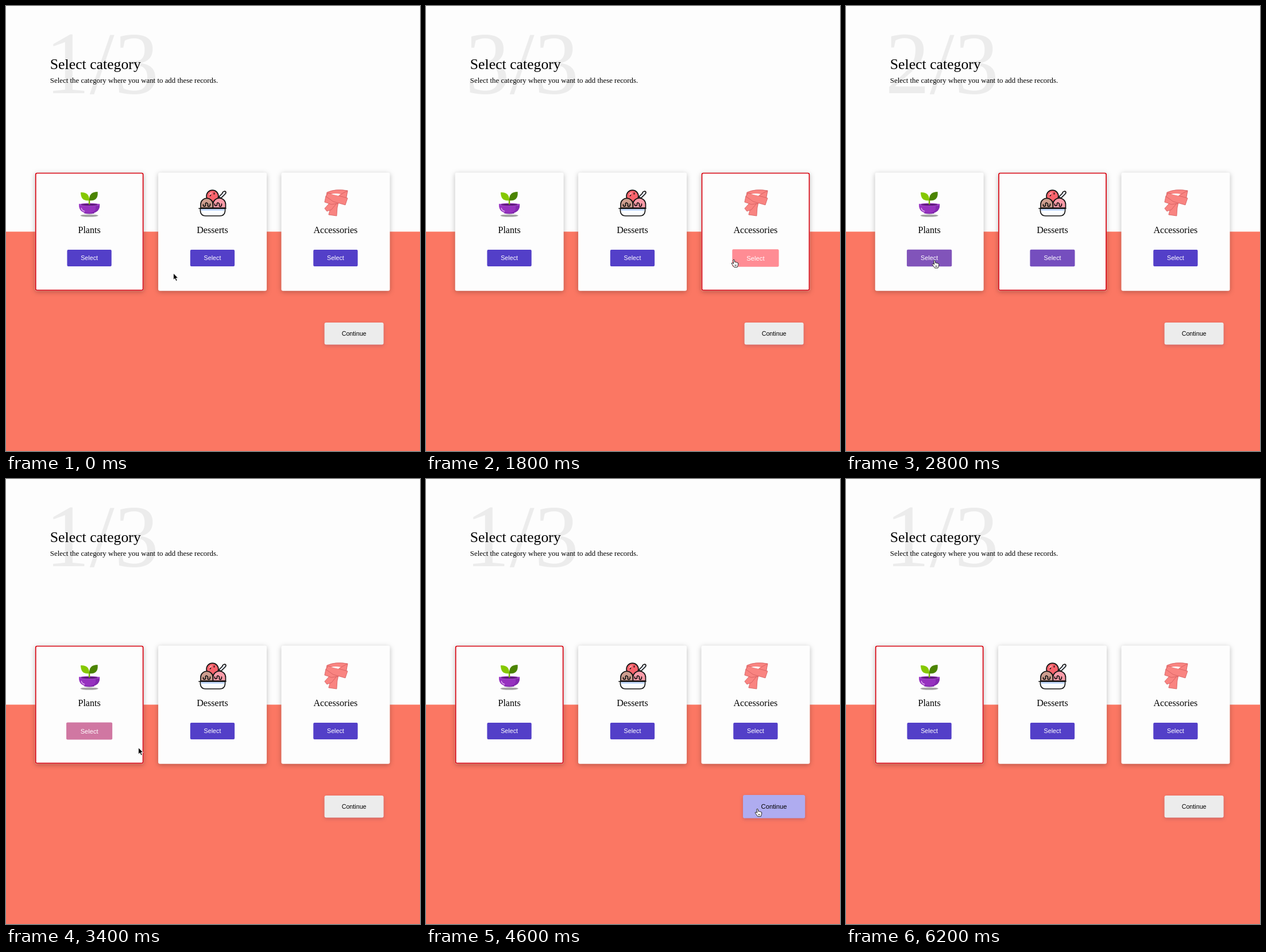
Write an HTML page that moves like this. It is 721 by 776 pixels and loops after 6.4 s.

```html
<!DOCTYPE html>
<html lang="en">
<meta charset="utf-8">
<title>Select category</title>
<style>
  html, body { margin: 0; width: 100%; height: 100%; overflow: hidden; background: #fdfdfd; }
  svg { display: block; font-family: "Liberation Serif", Times, serif; }
  .mid { text-anchor: middle; }
  .label { font: 10.73px "Liberation Sans", Arial, sans-serif; text-anchor: middle; }
  .card { filter: drop-shadow(0 2px 4px rgba(0, 0, 0, .26)); }
  .lift { filter: drop-shadow(0 2px 3px rgba(70, 40, 90, .26)); }
  .line { stroke: #111; stroke-width: 1.7; stroke-linecap: round; stroke-linejoin: round; }
  .scarf { fill: #f98481; stroke: #d25a5c; stroke-width: .8; stroke-linejoin: round; }
</style>
<svg id="stage" width="721" height="776" viewBox="0 0 721 776">
  <rect width="721" height="776" fill="#fdfdfd"/>
  <rect y="393.5" width="721" height="383" fill="#fb7763"/>
  <text id="step" x="68.5" y="152" font-size="154.5" fill="#ececec">1/3</text>
  <text x="76.8" y="109.5" font-size="25.76">Select category</text>
  <text x="76.8" y="133.7" font-size="12.88">Select the category where you want to add these records.</text>
  <g id="cards"></g>
  <g id="cursor">
    <path id="arrow" d="M0 0V11.6L2.7 9.2 4.6 13.6 6.7 12.7 4.8 8.4H8.3Z" stroke="#fff" stroke-width=".9"/>
    <path id="hand" d="M-1.2 1Q0-.8 1.2 1L1.7 4.6Q3 3.8 3.9 5 5.3 4.4 6 5.7 7.6 5.4 7.8 7L7.2 10.6 6.2 13.4H.6L-1.6 10.2-3.8 7.1Q-3.6 5.2-1.6 6.3L-.3 7.4ZM2.2 9.2V11.4M4 9.2V11.4" fill="#fff" stroke="#222" stroke-width="1" stroke-linejoin="round"/>
  </g>
</svg>
<script>
const $ = id => document.getElementById(id);
const LOOP = 6400, TICK = 200, FADE = 200;
const VIOLET = [83, 63, 200], PINK = [255, 140, 148];
const GREY = [236, 236, 236], LILAC = [175, 172, 240];

const plant = `
  <ellipse cx="0" cy="365.6" rx="15.5" ry="2.2" fill="#a3a3a3"/>
  <path d="M-8 357H8L9 361.5Q0 363.5-9 361.5Z" fill="#7620a5"/>
  <path d="M-18 345Q-19 360-4 361H4Q19 360 18 345Z" fill="#9632bf"/>
  <path d="M3 361H4Q19 360 18 345L11 349Q13 358 3 361Z" fill="#8229ad"/>
  <ellipse cx="0" cy="346.5" rx="18" ry="2.7" fill="#a94bd0"/>
  <ellipse cx="0" cy="346.5" rx="14.5" ry="1.7" fill="#5b1a78"/>
  <path d="M-14 352Q-13 357-8 358" fill="none" stroke="#d9a5ec" stroke-width="1.4"/>
  <path d="M0 346V336" stroke="#73b500" stroke-width="2.4"/>
  <path d="M-15 325Q0 324 0 339Q-15 341-15 325Z" fill="#85c800"/>
  <path d="M14.5 324Q-1 324 0 339Q16 341 14.5 324Z" fill="#4b8400"/>`;

const dessert = `
  <g class="line">
    <path d="M11 333 17 327Q18 323 22 323Q25 325 22 328L15 335Z" fill="#eaf1ff"/>
    <circle cx="0" cy="331.5" r="10.4" fill="#f9636c"/>
    <path d="M-20.5 352V346A10.7 10.7 0 0 1 1 346V352Z" fill="#cd9e8f"/>
    <path d="M1 352V346A11 11 0 0 1 23 346V352Z" fill="#fd9ca9"/>
    <path d="M-16 346V348Q-14 351-12 348V344Q-10 342-8 345V349Q-5 351-4 347V345M4 345V347Q6 350 8 347V344Q10 342 12 345V349Q15 351 16 347V345" fill="none"/>
    <path d="M-21 353H22V358Q21 366 13 366H-12Q-20 366-21 358Z" fill="#fbfdff"/>
    <path d="M-20 354H21V357H-20Z" fill="#c4dafd" stroke="none"/>
    <path d="M-23.5 353H23.5" fill="none"/>
  </g>
  <path d="M-5 330Q-4 326-1 326" fill="none" stroke="#ffb4b7" stroke-width="1.3"/>
  <path d="M-4 331 -3 330M3 328V326" class="line"/>`;

const scarf = `
  <g class="scarf">
    <path d="M-6 342 6 338 3 352 2 366-12 364-9 353Z"/>
    <path d="M-9 342 2 344-7 355-15 358-19 353Z"/>
    <path d="M-15 325Q0 318 21 322L18 333Q9 329-6 329L-16 332Z"/>
    <path d="M21 322 19 334 5 344-7 346-19 342-17 332 2 333 10 328Z"/>
    <path d="M-17 332-13 326 21 335 17 347-4 341Z"/>
  </g>
  <path d="M-8 328Q0 326 9 328L5 331Z" fill="#fdfdfd"/>`;

const button = (i, y, w, h, r, text, fill) => `
  <g id="btn${i}" data-y="${y}">
    <rect x="${-w / 2}" y="${-h / 2}" width="${w}" height="${h}" rx="${r}"/>
    <text class="label" y="3.9" fill="${fill}">${text}</text>
  </g>`;

const items = [["Plants", plant], ["Desserts", dessert], ["Accessories", scarf]];
$("cards").innerHTML = items.map(([name, icon], i) => `
  <g transform="translate(${145.1 + 214.4 * i})">
    <rect class="card" x="-94.4" y="290.5" width="189" height="206.2" rx="3" fill="#fdfdfd"/>
    <rect id="ring${i}" x="-93.4" y="291.5" width="187" height="204.2" rx="2.4" fill="none" stroke="#d6000d" stroke-width="1.7"/>
    ${icon}
    <text class="mid" y="395.5" font-size="16.1">${name}</text>
    ${button(i, 439.5, 77.3, 29, 2, "Select", "#fff")}
  </g>`).join("") + `
  <g class="lift" transform="translate(606.1)">
    ${button(3, 571.3, 103, 38.6, 3, "Continue", "#000")}
  </g>`;

// Pointer tip: time, x, y
const path = [
  [0, 291.5, 466], [200, 338, 444], [600, 342, 442], [1000, 507, 466], [1200, 540, 444],
  [1400, 536, 442], [1900, 536, 442], [2400, 352, 444], [2600, 348, 442], [2800, 154, 443.5],
  [3300, 152, 443], [3800, 545, 570], [4000, 574.5, 576], [4600, 577, 575], [5000, 706, 560]
];
// Button, enter time, leave time
const hovers = [[1, 150, 700], [2, 1130, 1920], [1, 2290, 2640], [0, 2746, 3345], [3, 3830, 4730]];
// Time, selected card
const picks = [[0, 0], [400, 1], [1200, 2], [2600, 1], [3000, 0]];

const clamp = v => Math.max(0, Math.min(1, v));
const mix = (a, b, p) => a + (b - a) * p;

function pointer(t) {
  const n = path.findIndex(p => p[0] > t);
  if (n < 0) return path[path.length - 1].slice(1);
  const [a, b] = [path[n - 1], path[n]], p = (t - a[0]) / (b[0] - a[0]);
  return [mix(a[1], b[1], p), mix(a[2], b[2], p)];
}

function draw(t) {
  const picked = picks.filter(p => p[0] <= t).pop()[1];
  $("step").textContent = `${picked + 1}/3`;
  for (let i = 0; i < 4; i++) {
    const p = Math.max(...hovers.filter(h => h[0] === i)
      .map(([, a, b]) => clamp(Math.min((t - a) / FADE, 1 - (t - b) / FADE))));
    const [from, to] = i < 3 ? [VIOLET, PINK] : [GREY, LILAC];
    const el = $("btn" + i);
    el.setAttribute("transform", `translate(0 ${el.dataset.y}) scale(${1 + .05 * p})`);
    el.firstElementChild.setAttribute("fill", `rgb(${from.map((c, k) => Math.round(mix(c, to[k], p)))})`);
    if (i < 3) $("ring" + i).style.display = i === picked ? "" : "none";
  }
  const hand = hovers.some(([, a, b]) => t >= a && t < b);
  $("hand").style.display = hand ? "" : "none";
  $("arrow").style.display = hand ? "none" : "";
  $("cursor").style.display = t < 5200 ? "" : "none";
  $("cursor").setAttribute("transform", `translate(${pointer(t)})`);
}

function loop() {
  draw(Math.floor(performance.now() % LOOP / TICK) * TICK);
  requestAnimationFrame(loop);
}
loop();
</script>
</html>
```
